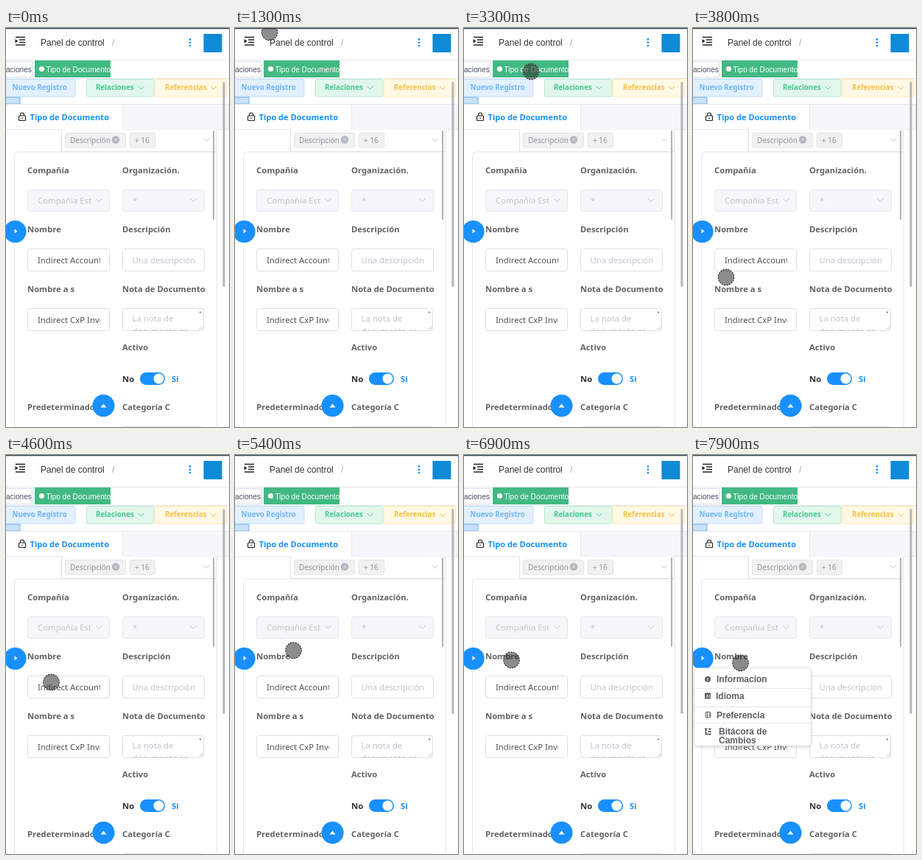
These frames come from a looping animation (303 by 541 pixels, 8000 ms). An HTML page:

```html
<!DOCTYPE html>
<html lang="es">
<head>
<meta charset="utf-8">
<title>Panel de control</title>
<style>
html, body { margin: 0; width: 100%; height: 100%; overflow: hidden; background: #fff; }
svg { display: block; width: 100%; height: 100%; }
text { font: 11.35px "Noto Sans", sans-serif; fill: #606266; white-space: pre; }
.label { font-size: 11.25px; font-weight: 700; }
.title { font-size: 11.1px; font-weight: 700; fill: #1890ff; }
.state { font-weight: 600; fill: #303133; }
.state.on { fill: #1890ff; }
.hint { fill: #c0c4cc; }
.value { fill: #505255; }
.small { font-size: 10px; fill: #909399; }
.ui { font: 12px "Liberation Sans", Arial, sans-serif; }
.dark { fill: #303133; }
.tag { font-size: 10.1px; }
.button { font-size: 9.7px; font-weight: 600; }
.menu text { font-weight: 700; fill: #5c5e62; }
.field { fill: #fff; stroke: #dcdfe6; }
.off { fill: #f5f7fa; stroke: #e4e7ed; }
.line { fill: none; stroke: #e4e7ed; }
.chevron { fill: none; stroke: #c0c4cc; }
.blue { fill: #1890ff; }
.shadow { filter: drop-shadow(0 1px 2px rgba(0,0,0,.2)); }
</style>
</head>
<body>
<svg viewBox="0 0 303 541">
<defs>
  <path id="chevron" d="M-4 -2L0 2L4 -2"/>
  <clipPath id="left"><path d="M30 215H116V255H30ZM30 300H128V411H30Z"/></clipPath>
  <clipPath id="note"><path d="M159 381H269V410.5H159Z"/></clipPath>
  <clipPath id="tagbox"><path d="M39 44H142V67H39Z"/></clipPath>
</defs>
<rect width="303" height="541" fill="#fff"/>

<!-- header -->
<rect width="303" height="1.3" fill="#36444c"/>
<path d="M13 12.5H26M18 16H26M18 19.5H26M13 23H26" stroke="#222" stroke-width="1.5"/>
<path d="M12.5 15L16.5 17.8L12.5 20.6Z" fill="#222"/>
<text class="ui dark" x="47" y="24">Panel de control</text>
<text class="ui" x="144" y="24" style="fill:#97a8be">/</text>
<g class="blue"><circle cx="250" cy="15.5" r="1.4"/><circle cx="250" cy="19.8" r="1.4"/><circle cx="250" cy="24.1" r="1.4"/></g>
<rect x="268.5" y="8" width="25" height="25" fill="#0f8ad6"/>

<!-- open pages -->
<path d="M0 43.5H303M0 68.5H303" stroke="#e4e7ed"/>
<path d="M0 45.5H35.5V66.5H0" class="line" style="stroke:#d8dce5"/>
<text class="ui tag" x="0" y="60" style="fill:#495060">aciones</text>
<rect x="39" y="44" width="103" height="23" fill="#42b983"/>
<circle cx="48.5" cy="55.5" r="3.6" fill="#fff"/>
<text class="ui tag" x="54.5" y="60" clip-path="url(#tagbox)" style="fill:#fff">Tipo de Documento</text>

<!-- actions -->
<rect x="-5.5" y="69.5" width="99.5" height="23.5" rx="2" fill="#e2f0ff" stroke="#c0defc"/>
<text class="button" x="8.5" y="83.5" style="fill:#6fb6f7">Nuevo Registro</text>
<rect x="109.5" y="69.5" width="91.5" height="23.5" rx="2" fill="#e2f7ec" stroke="#b8e9d0"/>
<text class="button" x="122" y="84.2" style="fill:#45c88d">Relaciones</text>
<use href="#chevron" x="183.500" y="81" fill="none" stroke="#45c88d"/>
<rect x="202" y="69.5" width="98" height="23.5" rx="2" fill="#fff8e4" stroke="#ffe8ae"/>
<text class="button" x="216" y="84.2" style="fill:#fac146">Referencias</text>
<use href="#chevron" x="282" y="81" fill="none" stroke="#fac146"/>
<rect x="-5" y="94" width="24" height="9" fill="#c9e1f8" stroke="#72aee9"/>

<!-- tab -->
<path d="M158.5 103.5H303V137.5H158.5Z" class="off"/>
<path d="M0 103.5H158M0 137.5H75" class="line"/>
<g fill="none" stroke="#222" stroke-width="1.2">
  <rect x="17.5" y="119" width="9" height="6.5" rx="1"/>
  <path d="M19.5 119V117.5a2.500 2.500 0 0 1 5 0V119M22 121.5V123.500"/>
</g>
<text class="title" x="32.5" y="125">Tipo de Documento</text>

<!-- column picker -->
<path d="M75.5 137.5V167.5H285.5V137.5" class="field"/>
<g fill="#f1f1f2" stroke="#e2e3e5"><rect x="80.5" y="142.5" width="82" height="19.5" rx="2"/><rect x="168.5" y="142.5" width="34" height="19.5" rx="2"/></g>
<text class="small" x="87" y="155.5">Descripción</text>
<circle cx="149" cy="151.5" r="5.2" fill="#b2b6be"/>
<path d="M147 149.5L151 153.5M151 149.5L147 153.5" stroke="#eceef0"/>
<text class="small" x="175" y="155.5">+ 16</text>
<use href="#chevron" class="chevron" x="272" y="151.5"/>

<!-- form -->
<path d="M11.5 541V172a4 4 0 0 1 4 -4H282.5a4 4 0 0 1 4 4V541" class="line"/>
<g class="off"><rect x="29.5" y="219.5" width="111" height="29" rx="3"/><rect x="158.5" y="219.5" width="111" height="29" rx="3"/><rect x="158.5" y="540.5" width="111" height="29" rx="3"/></g>
<g class="field"><rect x="29.5" y="299.5" width="111" height="30" rx="3"/><rect x="158.5" y="299.5" width="111" height="30" rx="3"/><rect x="29.5" y="380.5" width="111" height="30" rx="3"/><rect x="158.5" y="380.5" width="110" height="30" rx="3"/></g>
<use href="#chevron" class="chevron" x="126.500" y="233.500"/>
<use href="#chevron" class="chevron" x="254.500" y="233.500"/>
<text class="label" x="29" y="197">Compañía</text><text class="label" x="158" y="197">Organización.</text>
<text class="label" x="29" y="277">Nombre</text><text class="label" x="158" y="277">Descripción</text>
<text class="label" x="29" y="358">Nombre a s</text><text class="label" x="158" y="358">Nota de Documento</text>
<text class="label" x="158" y="437">Activo</text>
<text class="label" x="29" y="518">Predeterminado</text><text class="label" x="158" y="518">Categoría C</text>
<g clip-path="url(#left)">
  <text class="hint" x="43" y="238">Compañía Est</text>
  <text class="value" x="43" y="319">Indirect Account</text>
  <text class="value" x="43" y="400">Indirect CxP Invoice</text>
</g>
<text class="hint" x="172" y="238">*</text>
<text class="hint" x="171.5" y="319">Una descripción</text>
<g clip-path="url(#note)"><text class="hint" x="171.5" y="398">La nota de</text><text class="hint" x="171.5" y="415">documento es</text></g>
<path d="M262.5 409L267.5 404M265.5 409L267.5 407" stroke="#aaa" stroke-width=".8"/>
<circle cx="264" cy="385.5" r="1.2" fill="#8c9098"/>
<text class="state" x="158" y="480">No</text>
<rect class="blue" x="182" y="467" width="34" height="17" rx="8.5"/>
<circle cx="207.5" cy="475.5" r="7" fill="#fff"/>
<text class="state on" x="225" y="480">Si</text>
<rect x="281" y="139" width="2.2" height="121" rx="1" fill="#b4b5b7"/>
<rect x="294.5" y="73" width="3" height="278" rx="1.5" fill="#b4b5b7"/>

<circle class="blue" cx="132.5" cy="512" r="15.1"/>
<path d="M128.5 514.5L132.5 509.5L136.5 514.5Z" fill="#fff"/>
<circle class="blue" cx="12.5" cy="276" r="15.1"/>
<path d="M11.5 272.5L15.5 275.5L11.5 278.5Z" fill="#fff"/>

<g id="menu" class="menu" opacity="0">
  <rect class="shadow" x="2.5" y="289" width="157.5" height="105" rx="2" fill="#fff" stroke="#e8ebf1"/>
  <path d="M3 316.5H160M3 341.5H160M3 363.5H160" class="line"/>
  <circle cx="20" cy="304" r="4" fill="#5c5e62"/><path d="M20 302V306.5" stroke="#fff"/>
  <rect x="16" y="322.5" width="8" height="8" rx="1" fill="#5c5e62"/><path d="M18 329L19.5 325L21 329M22.5 325V329" fill="none" stroke="#fff" stroke-width=".8"/>
  <path d="M17.5 348.5H23.5V356H17.5ZM19.5 348.5V356M21 351H23M21 353.5H23" fill="none" stroke="#5c5e62"/>
  <path d="M16 371.5H19.5M21 371.5H24.5M17.5 371V378.5H20M20.5 375H24.5M20.5 378.5H24.5" fill="none" stroke="#5c5e62" stroke-width="1.8"/>
  <text class="ui" x="32" y="307.5">Informacion</text>
  <text class="ui" x="31" y="331">Idioma</text>
  <text class="ui" x="32" y="356.5">Preferencia</text>
  <text class="ui" x="35" y="378.5">Bitácora de</text>
  <text class="ui" x="35" y="390.5">Cambios</text>
</g>

<g id="pointer" visibility="hidden">
  <circle r="11" fill="#222" fill-opacity=".52"/>
  <circle r="10.7" fill="none" stroke="#ccc" stroke-opacity=".6"/>
  <circle r="10.7" fill="none" stroke="#222" stroke-width="1.1" stroke-dasharray="2 1.5"/>
</g>
</svg>
<script>
const LOOP = 8000, STEP = 100, APPEAR = 1300, MENU_OPEN = 7100, MENU_TIME = 300;
// time, x, y
const path = [
  [1300, 47, 6], [1500, 36, 130], [1600, 34, 194], [1700, 41, 217], [1800, 42, 219],
  [2100, 43, 216], [3200, 43, 216], [3300, 91, 59], [3400, 92, 59], [3600, 92, 59],
  [3700, 66, 215], [3800, 45, 338], [4100, 45, 338], [4400, 63, 300], [4500, 63, 300],
  [4600, 61.5, 308], [5000, 114, 288], [5400, 79.500, 265], [5700, 57, 281], [5800, 57, 281],
  [6000, 88, 278.5], [6200, 64.5, 278], [7800, 64.5, 278], [7900, 64.5, 282], [LOOP, 64.5, 282]
];
const pointer = document.getElementById("pointer");
const menu = document.getElementById("menu");
const mix = (a, b, k) => a + (b - a) * k;

function pointerAt(t) {
  const i = path.findIndex(p => p[0] > t);
  const [t0, x0, y0] = path[i - 1], [t1, x1, y1] = path[i];
  const k = (t - t0) / (t1 - t0);
  return [mix(x0, x1, k), mix(y0, y1, k)];
}

function draw(now) {
  const t = Math.floor(now % LOOP / STEP) * STEP;
  const shown = t >= APPEAR;
  pointer.setAttribute("visibility", shown ? "visible" : "hidden");
  if (shown) pointer.setAttribute("transform", `translate(${pointerAt(t)})`);
  const p = Math.min(1, Math.max(0, (t - MENU_OPEN) / MENU_TIME));
  const open = 1 - (1 - p) ** 3;
  menu.setAttribute("opacity", open);
  menu.setAttribute("transform", `translate(0 289) scale(1 ${open}) translate(0 -289)`);
}

const start = performance.now();
function frame() {
  draw(performance.now() - start);
  requestAnimationFrame(frame);
}
frame();
</script>
</body>
</html>
```
